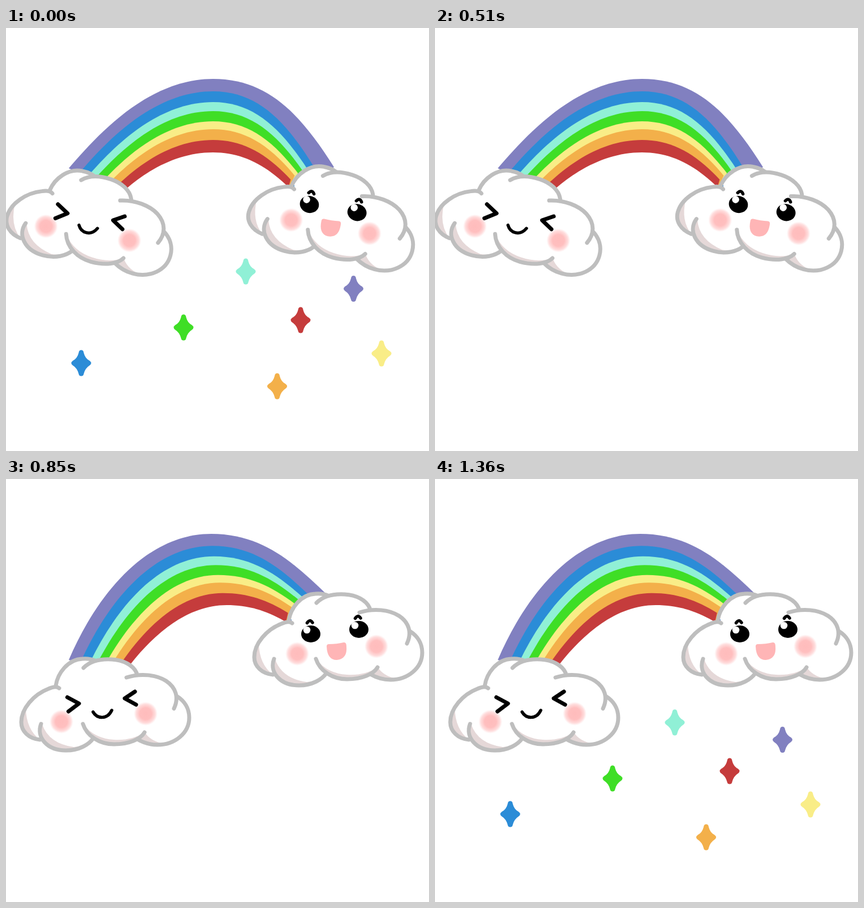
Write an HTML page that moves like this. It is 748 by 748 pixels and loops after 1.53 s.

```html
<!DOCTYPE html>
<html lang="en">
<head>
<meta charset="utf-8">
<title>Rainbow clouds</title>
<style>
html, body { margin: 0; width: 100%; height: 100%; overflow: hidden; background: #fff; }
svg { display: block; width: 100vw; height: 100vh; }
.line, .ink { fill: none; stroke: #bebebe; stroke-width: 7; stroke-linecap: round; stroke-linejoin: round; }
.ink { stroke: #000; }
.thin { stroke-width: 5.5; }
</style>
</head>
<body>
<svg viewBox="0 0 748 748">
  <defs>
    <radialGradient id="blush">
      <stop offset="0" stop-color="#ffbcbc"/>
      <stop offset=".5" stop-color="#ffbfbf"/>
      <stop offset=".8" stop-color="#ffc6c6" stop-opacity=".6"/>
      <stop offset="1" stop-color="#ffd0d0" stop-opacity="0"/>
    </radialGradient>
    <circle id="cheek" r="21" fill="url(#blush)"/>
    <path id="star" d="M0-23Q4-23 4.5-18Q7-8 15-4Q20 0 15 4Q7 9 4.5 19Q4 23 0 23Q-4 23-4.5 19Q-7 9-15 4Q-20 0-15-4Q-7-8-4.5-18Q-4-23 0-23Z"/>
    <g id="lobes">
      <path d="M94 370Q88 365 75 371C49 381 27 406 27 430C27 446 40 459 60 461"/>
      <path d="M62 433C53 456 72 480 106 480C130 480 147 469 154 459"/>
      <path d="M136 433C143 455 166 469 191 469C218 469 238 460 245 448"/>
      <path d="M232 460C244 467 254 470 268 470C299 470 324 449 324 422C324 405 315 392 302 384"/>
      <path d="M213 351C238 343 266 346 283 357C301 369 306 387 297 406"/>
      <path d="M137 334C151 320 170 318 187 319C207 320 225 329 231 343"/>
      <path d="M88 366C91 343 110 319 135 318Q148 317 157 321"/>
    </g>
    <g id="cloud">
      <g fill="#fff">
        <path d="M94 370L90 350L137 330L157 322L231 343L302 384L297 407L245 448L154 459L60 461L35 420Z"/>
        <use href="#lobes"/>
      </g>
      <g fill="#e5d8d8">
        <path d="M35 406Q36 443 60 461Q28 458 27 430Q28 417 35 406Z"/>
        <path d="M64 434Q76 468 120 474Q138 472 150 463Q138 480 106 480Q70 478 60 455Z"/>
        <path d="M137 434Q156 459 191 461Q222 463 245 448Q232 469 191 469Q148 465 137 434Z"/>
        <path d="M232 460L245 447Q254 463 278 468Q252 473 232 460Z"/>
      </g>
      <use href="#lobes" class="line"/>
    </g>
    <g id="eye">
      <ellipse rx="17" ry="15"/>
      <circle cx="-7" cy="-7" r="6.3" fill="#fff"/>
      <path class="ink thin" d="M-6.5-19.5Q-2-27 3-20"/>
    </g>
  </defs>
  <g id="bow"></g>
  <g id="left">
    <use href="#cloud"/>
    <use href="#cheek" x="98" y="429"/>
    <use href="#cheek" x="247" y="415"/>
    <path class="ink" d="M108.5 386L129 397L110.5 411M228 376L210 388L230 399"/>
    <path class="ink thin" d="M154 412C161 424 179 426 187 409"/>
  </g>
  <g id="right">
    <use href="#cloud"/>
    <use href="#cheek" x="103" y="424"/>
    <use href="#cheek" x="243" y="411"/>
    <use href="#eye" x="127" y="389"/>
    <use href="#eye" x="212" y="381"/>
    <path fill="#ffb5b6" d="M155 411Q155 407 159 407Q173 407 185 404Q190 403 190 411Q192 433 173 435Q156 435 155 411Z"/>
  </g>
  <g id="stars"></g>
</svg>
<script>
const STEP = 170, STEPS = 9;
const [purple, blue, cyan, green, yellow, orange, red] =
  ['#8180c0', '#2b8cd7', '#90f0d6', '#3fde26', '#f9ed87', '#f3b04a', '#c53c3c'];
// Colour and relative width, from the outside in; white clears the inside.
const BANDS = [[purple, 22], [blue, 19], [cyan, 16], [green, 18], [yellow, 14], [orange, 19], [red, 22], ['#fff', 0]];
const TOTAL = BANDS.reduce((sum, [, width]) => sum + width, 0);
const STARS = [
  [424, 430.5, cyan], [614.5, 461, purple], [521, 516.5, red], [314, 529.5, green],
  [664, 575.5, yellow], [133, 592.5, blue], [479.5, 633.5, orange]
];
// Outer and inner rim: left foot, apex, right foot.
const TILTED = [[111, 248, 366, 90, 580, 246], [213, 284, 366, 220, 496, 278]];
const LEVEL = [[111, 320, 363, 97, 568, 205], [219, 329, 390, 223, 492, 251]];
// How each of those six values spreads from the outer rim to the inner one.
const SPREAD = [0.9, 1, 1.5, 1, 0.5, 2];

const $ = id => document.getElementById(id);
const lerp = (a, b, k) => a + (b - a) * k;
const bulge = k => 4 * k * (1 - k);
const make = (parent, tag, attrs) => {
  const el = document.createElementNS(parent.namespaceURI, tag);
  for (const key in attrs) el.setAttribute(key, attrs[key]);
  return parent.appendChild(el);
};

let offset = 0;
const bands = BANDS.map(([fill, width]) => {
  const band = { u: offset / TOTAL, el: make($('bow'), 'path', { fill }) };
  offset += width;
  return band;
});
for (const [x, y, fill] of STARS) make($('stars'), 'use', { href: '#star', x, y, fill });

function place(id, x, y, angle) {
  $(id).setAttribute('transform', `translate(${x} ${y}) rotate(${angle}) translate(-175 -400)`);
}

function edge(u, k) {
  const mix = rims => SPREAD.map((power, i) => lerp(rims[0][i], rims[1][i], u ** power));
  const tilted = mix(TILTED), level = mix(LEVEL);
  const points = tilted.map((v, i) => lerp(v, level[i], k));
  points[3] -= 2 * bulge(k);
  return points;
}

function drawBow(k) {
  const [innerL, innerLY, , , innerR, innerRY] = edge(1, k);
  for (const { u, el } of bands) {
    const [lx, ly, ax, ay, rx, ry] = edge(u, k);
    const reach = lerp(0.55, 0.63, u), drop = u < 1 ? 15 : 45;
    const leftRise = lerp(lerp(0.375, 0.53, k), 0.6, u);
    const rightRise = lerp(lerp(0.61, 0.51, k), 0.67, u);
    el.setAttribute('d', `M${lx} ${ly}` +
      `C${lerp(lx, ax, lerp(0.2, 0.29, u))} ${lerp(ly, ay, leftRise)} ${lerp(lx, ax, reach)} ${ay} ${ax} ${ay}` +
      `C${lerp(ax, rx, 1 - reach)} ${ay} ${lerp(rx, ax, lerp(0.28, 0.32, u))} ${lerp(ry, ay, rightRise)} ${rx} ${ry}` +
      `L${innerR} ${innerRY + drop}L${innerL} ${innerLY + drop}Z`);
  }
}

let shown = -1;
function draw(ms) {
  const step = Math.floor(ms / STEP) % STEPS;
  if (step === shown) return;
  shown = step;
  const k = step % 3 / 2, angle = 15 * (1 - k), swing = 2.5 * bulge(k);
  drawBow(k);
  place('left', lerp(152.5, 175, k) - swing, lerp(342.5, 400, k), angle);
  place('right', lerp(580, 587, k) + swing, lerp(335, 285, k), angle);
  $('stars').setAttribute('visibility', step % 2 ? 'hidden' : 'visible');
}

const start = performance.now();
function tick() {
  draw(performance.now() - start);
  requestAnimationFrame(tick);
}
tick();
</script>
</body>
</html>
```
